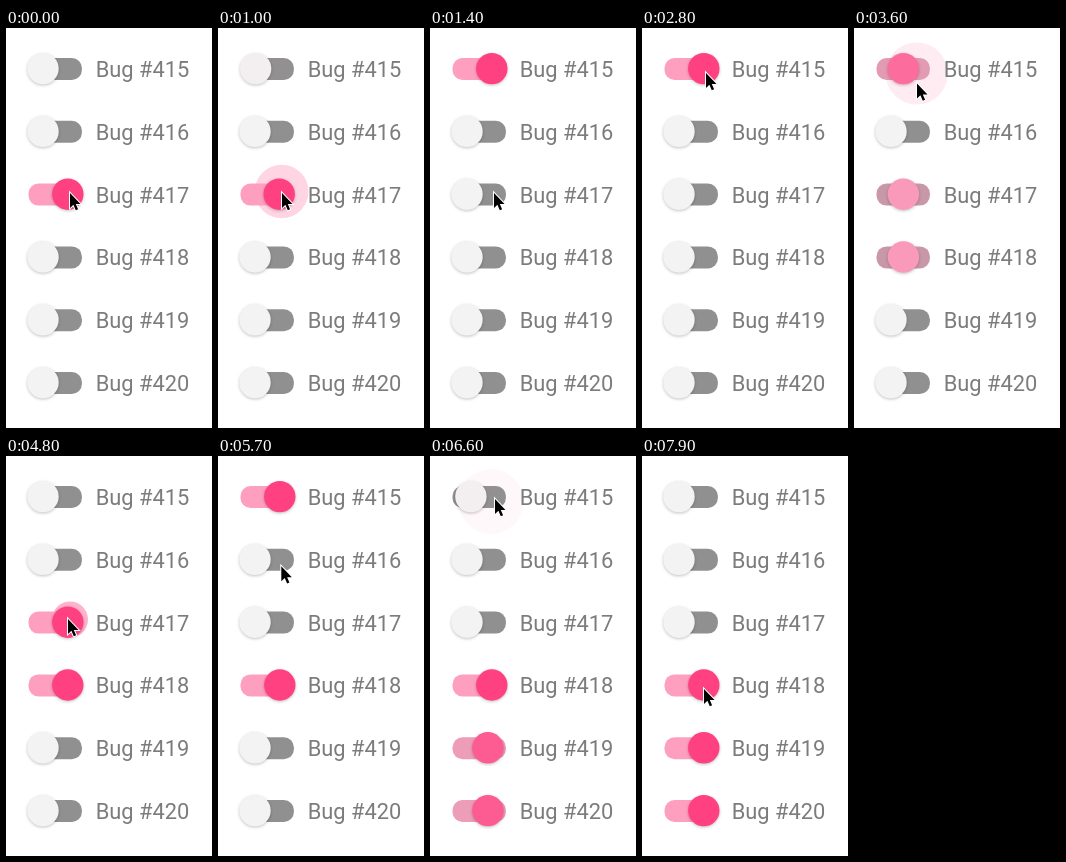
Animation, 206 px wide and 400 px high, one loop 8 s. Source, as an HTML page:

```html
<!DOCTYPE html>
<html lang="en">
<head>
<meta charset="utf-8">
<title>Bug switches</title>
<style>
  html, body { margin: 0; width: 100%; height: 100%; overflow: hidden; background: #fff; }
  svg { display: block; width: 206px; height: 400px; }
  text { font: 21.85px Roboto, Arial, sans-serif; fill: #7c7c7c; }
  .thumb { filter: drop-shadow(0 1.3px 1.4px rgba(0, 0, 0, .24)); }
</style>
</head>
<body>
<svg id="stage" viewBox="0 0 206 400"></svg>
<script>
const LOOP = 8000, STEP = 100, SLIDE = 250, RIPPLE = 500;
const OFF_X = 37, ON_X = 61.8;
const rowY = i => 41 + 62.8 * i;

// Each click turns its own row off and other rows on.
const clicks = [
  { t: 900, row: 2, on: [0], lag: 75 },
  { t: 3400, row: 0, on: [2, 3], lag: 75 },
  { t: 4800, row: 2, on: [0], lag: 75 },
  { t: 6300, row: 0, on: [4, 5], lag: 115 }
];

// Eased pointer trips; it rests between them.
const home = { x: 64, y: 165 };
const trips = [
  { from: 2400, to: 2800, x: 64, y: 45 },
  { from: 2800, to: 3000, x: 63, y: 55.5 },
  { from: 3800, to: 4250, x: 66, y: 156 },
  { from: 4250, to: 4500, x: 59, y: 163 },
  { from: 4500, to: 4600, x: 62, y: 163 },
  { from: 5400, to: 6050, x: 65, y: 43 },
  { from: 7000, to: 7900, x: 62, y: 233 }
];

const clamp = v => Math.min(1, Math.max(0, v));
const mix = (a, b, p) => a + (b - a) * p;
const ease = p => (1 - Math.cos(Math.PI * clamp(p))) / 2;
const blend = (a, b, p) => `rgb(${a.map((v, i) => Math.round(mix(v, b[i], p)))})`;

const stage = document.getElementById("stage");
function set(el, attrs) {
  for (const k in attrs) el.setAttribute(k, attrs[k]);
}
function add(tag, attrs) {
  const el = document.createElementNS("http://www.w3.org/2000/svg", tag);
  set(el, attrs);
  return stage.appendChild(el);
}

const ripple = add("circle", { fill: "#ff4081" });
const rows = Array.from({ length: 6 }, (_, i) => {
  const y = rowY(i);
  const track = add("rect", { x: 22.5, y: y - 11, width: 53.4, height: 22, rx: 10 });
  const thumb = add("circle", { class: "thumb", cy: y - .4, r: 15.7 });
  add("text", { x: 89.7, y: y + 8 }).textContent = "Bug #" + (415 + i);
  return { track, thumb };
});
const pointer = add("path", {
  d: "M0 0V15L3.4 11.8L5.8 17.2L8.1 16.2L5.8 11H10.5Z",
  fill: "#000", stroke: "#fff", "stroke-width": 2, "paint-order": "stroke"
});

// Position and tint of a switch, 0 = off, 1 = on.
function switchState(i, t) {
  let pos = i === 2 ? 1 : 0, tint = pos;
  for (const c of clicks) {
    if (t < c.t + c.lag) break;
    const p = ease((t - c.t - c.lag) / SLIDE);
    if (c.row === i) {
      pos = 1 - p;
      tint = 1 - ease((p - .3) / .6);
    } else if (c.on.includes(i)) {
      pos = tint = p;
    }
  }
  return { pos, tint };
}

function drawRipple(t) {
  const click = clicks.find(c => t >= c.t && t < c.t + RIPPLE);
  if (!click) return set(ripple, { r: 0 });
  const u = (t - click.t) / RIPPLE;
  set(ripple, {
    r: mix(18, 33, 1 - (1 - u) ** 4),
    opacity: .4 * (1 - u) ** 2.7,
    cx: 64 - 8 * u * u,
    cy: click.row ? 163.5 : 45.5
  });
}

function pointerAt(t) {
  let { x, y } = home;
  for (const trip of trips) {
    const p = ease((t - trip.from) / (trip.to - trip.from));
    x = mix(x, trip.x, p);
    y = mix(y, trip.y, p);
  }
  return `translate(${x} ${y})`;
}

function draw(t) {
  drawRipple(t);
  rows.forEach((row, i) => {
    const { pos, tint } = switchState(i, t);
    set(row.track, { fill: blend([144, 144, 144], [255, 159, 192], tint) });
    set(row.thumb, {
      cx: mix(OFF_X, ON_X, pos),
      fill: blend([243, 243, 243], [255, 64, 129], tint)
    });
  });
  set(pointer, { transform: pointerAt(t) });
}

const start = performance.now();
function tick() {
  const t = (performance.now() - start) % LOOP;
  draw(Math.floor(t / STEP) * STEP);
  requestAnimationFrame(tick);
}
tick();
</script>
</body>
</html>
```
